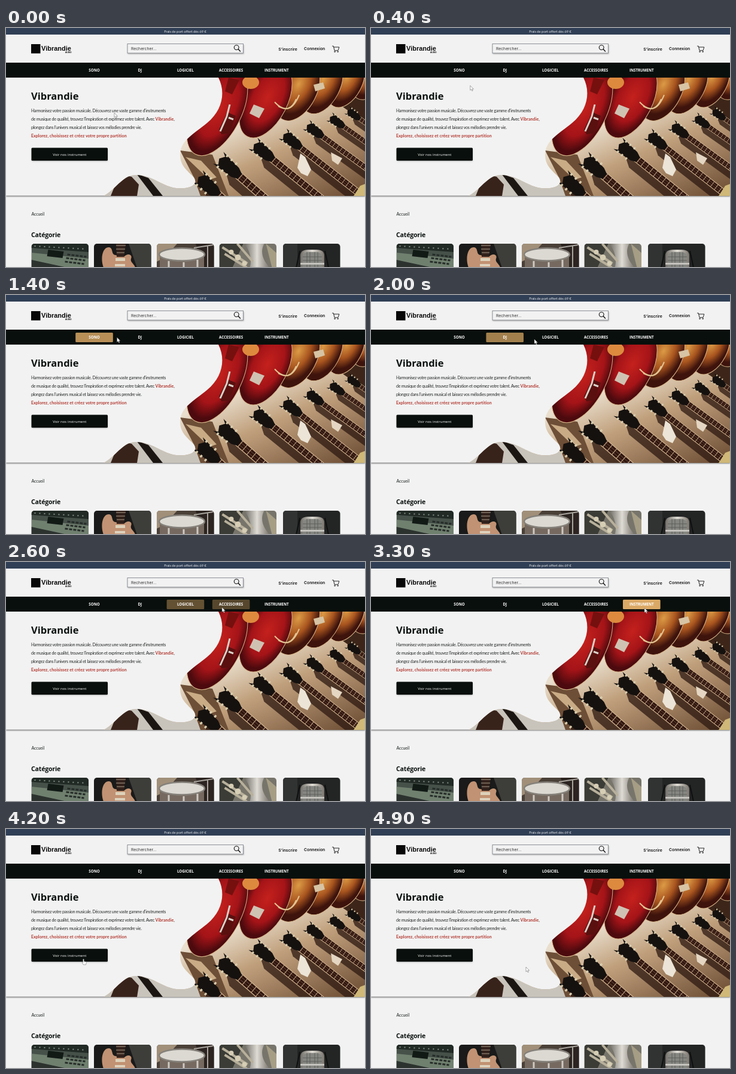
Write an HTML page that moves like this. It is 600x400 px and loops after 5 s.

```html
<!DOCTYPE html>
<html lang="fr">
<head>
<meta charset="utf-8">
<title>Vibrandie</title>
<style>
  html, body { margin: 0; width: 100%; height: 100%; overflow: hidden; background: #f2f2f2; }
  svg { display: block; width: 600px; height: 400px; }
  .sans { font-family: "Open Sans", sans-serif; }
  .ui { font-family: Inter, sans-serif; }
  .copy { font-family: Lato, sans-serif; font-size: 7.1px; letter-spacing: -.28px; }
  .bold { font-weight: 700; }
  .red { font-weight: 700; fill: #b23a32; letter-spacing: .02px; }
</style>
</head>
<body>
<svg viewBox="0 0 600 400">
  <defs>
    <linearGradient id="wall" x1="0" y1="0" x2="1" y2="1">
      <stop offset="0" stop-color="#d9c3a8"/>
      <stop offset=".45" stop-color="#eadfce"/>
      <stop offset=".65" stop-color="#c0a07c"/>
      <stop offset="1" stop-color="#6a4a31"/>
    </linearGradient>
    <radialGradient id="cherry" cx=".5" cy=".45">
      <stop offset="0" stop-color="#c4211d"/>
      <stop offset=".65" stop-color="#a51418"/>
      <stop offset="1" stop-color="#4c0a0e"/>
    </radialGradient>
    <radialGradient id="amber" cx=".45" cy=".4">
      <stop offset="0" stop-color="#dc9a45"/>
      <stop offset=".55" stop-color="#a9551f"/>
      <stop offset="1" stop-color="#3d130c"/>
    </radialGradient>
    <linearGradient id="metal">
      <stop offset="0" stop-color="#6f6c66"/>
      <stop offset=".5" stop-color="#dedbd4"/>
      <stop offset="1" stop-color="#77726a"/>
    </linearGradient>
    <filter id="soft" x="-10%" y="-30%" width="120%" height="180%"><feGaussianBlur stdDeviation="1"/></filter>
    <clipPath id="wave">
      <path d="M355 83C367 106 363 137 336 159C313 178 291 189 291 212C291 232 305 240 314 250C322 262 308 270 285 268C262 266 245 246 217 246C195 246 184 270 163 281H600V83Z"/>
    </clipPath>
    <clipPath id="card"><rect width="95.5" height="60" rx="5"/></clipPath>
  </defs>

  <rect width="600" height="400" fill="#f2f2f2"/>
  <rect y="279" width="600" height="3" fill="#777" filter="url(#soft)"/>
  <rect y="83" width="600" height="197.5" fill="#f2f2f2"/>

  <!-- hero picture -->
  <g clip-path="url(#wave)">
    <rect x="160" y="83" width="440" height="198" fill="url(#wall)"/>
    <path d="M160 281V240H300L330 281Z" fill="#c9c4bb"/>
    <path d="M175 281L184 259Q196 245 210 249L222 262L219 281Z" fill="#38231b"/>
    <path d="M218 244L238 251L262 281H246Z" fill="#1c1613"/>
    <path d="M291 205L345 212L372 281H325L314 250Z" fill="#6d4e36"/>
    <path d="M300 216L326 222L352 250L340 254Z" fill="#c9ac86"/>
    <path d="M540 83H600V158L560 130Z" fill="#3d2619"/>
    <g id="bodies"></g>
    <ellipse cx="409" cy="91" rx="14" ry="11" fill="#dd8a3e"/>
    <path d="M372 83L390 87L378 111L366 106Z" fill="#75100f"/>
    <path d="M370 141L384 147L374 176L360 178L356 170Z" fill="#59100f"/>
    <path d="M358 173L369 148L374 128M372 150L380 153" fill="none" stroke="#d9d2c8" stroke-width="3"/>
    <path d="M414 128L432 135L423 151L407 143Z" fill="#cfc2b2"/>
    <path d="M449 124Q474 151 490 112M455 131Q475 143 485 119" fill="none" stroke="#e2c492" stroke-width="2"/>
    <path d="M514 95L530 91L533 101L517 106Z" fill="#d7c4a4"/>
    <g id="necks"></g>
    <path d="M492 210L500 216L510 237L504 248L493 243L487 234Z" fill="#ece4d6"/>
    <path d="M543 208L562 218L555 229L545 222Z" fill="#e4d6c2"/>
    <path d="M581 281L592 264L600 261V281Z" fill="#cfb878"/>
  </g>

  <!-- header -->
  <rect width="600" height="11" fill="#303f55"/>
  <text x="299.5" y="8.3" text-anchor="middle" font-family="Lato, sans-serif" font-size="6" letter-spacing="-.1" fill="#dfe2e6">Frais de port offert dès 69 €</text>
  <rect x="42" y="27" width="15.5" height="15.5" fill="#080808"/>
  <g font-family="'Liberation Sans', sans-serif" class="bold" fill="#0a0a0a">
    <text x="59" y="38" font-size="11">Vibrandie</text>
    <text x="109.5" y="42.3" font-size="3.3" text-anchor="end">AUDIO</text>
  </g>
  <rect x="203.5" y="28" width="194" height="15.5" fill="#777" opacity=".6" filter="url(#soft)"/>
  <rect x="203" y="26.5" width="193.5" height="15.5" fill="#f2f2f2" stroke="#757b80" stroke-width=".8"/>
  <g class="ui" font-size="6.8" fill="#111">
    <text x="209" y="37" fill="#333">Rechercher...</text>
    <text x="455.3" y="37.5" font-weight="600">S'inscrire</text>
    <text x="498" y="37.2" font-weight="600">Connexion</text>
  </g>
  <g fill="none" stroke="#111" stroke-linecap="round" stroke-linejoin="round">
    <path d="M388.3 35.6L391.5 39" stroke-width="1.4"/>
    <circle cx="385.2" cy="32.6" r="3.9" stroke-width="1.1"/>
    <path d="M545.5 30.3H547.3L549 37.7H555L556.8 32H547.8" stroke-width=".9"/>
    <circle cx="549.5" cy="39.6" r=".9" stroke-width=".8"/>
    <circle cx="554.6" cy="39.6" r=".9" stroke-width=".8"/>
  </g>
  <rect y="58" width="600" height="25" fill="#080f0c"/>
  <g id="nav" class="sans bold" font-size="6.2" fill="#fff" text-anchor="middle"></g>

  <!-- hero copy -->
  <text x="42" y="120" class="sans bold" font-size="16.5" fill="#0b120f">Vibrandie</text>
  <g class="copy" fill="#242826">
    <text x="42" y="141.2">Harmonisez votre passion musicale. Découvrez une vaste gamme d'instruments</text>
    <text x="42" y="155">de musique de qualité, trouvez l'inspiration et exprimez votre talent. Avec <tspan class="red">Vibrandie</tspan>,</text>
    <text x="42" y="168.8">plongez dans l'univers musical et laissez vos mélodies prendre vie.</text>
    <text x="42" y="182.6" class="red">Explorez, choisissez et créez votre propre partition</text>
  </g>
  <rect x="43" y="202" width="127" height="21" rx="2" fill="#666" opacity=".5" filter="url(#soft)"/>
  <rect x="42.5" y="200.5" width="127.5" height="21.5" rx="1.5" fill="#080f0c"/>
  <text x="106.3" y="213.6" class="sans" font-size="6.1" font-weight="500" text-anchor="middle" fill="#fff">Voir nos instrument</text>

  <text x="42.5" y="314" font-family="Lato, sans-serif" font-size="7" letter-spacing="-.1" fill="#1c2421">Accueil</text>
  <text x="42" y="350" class="sans bold" font-size="10.6" letter-spacing="-.2" fill="#0b120f">Catégorie</text>

  <!-- category cards -->
  <g transform="translate(42.5 361)"><g clip-path="url(#card)">
    <rect width="96" height="40" fill="#46514a"/>
    <path d="M0 0H96V14L0 7Z" fill="#222a26"/>
    <path d="M0 15L96 25V40H0Z" fill="#70806f"/>
    <path d="M0 27L60 40H0Z" fill="#2c332f"/>
    <path d="M28 10L54 13L52 24L26 21Z" fill="#121a16"/>
    <path d="M60 18L92 22M58 24L90 28M56 30L88 34" stroke="#252c28" stroke-width="3" stroke-dasharray="5 2"/>
    <path d="M5 4L92 9" stroke="#829087" stroke-width="2" stroke-dasharray="2 6"/>
  </g></g>
  <g transform="translate(147 361)"><g clip-path="url(#card)">
    <rect width="96" height="40" fill="#191a19"/>
    <path d="M58 0H96V40H72Z" fill="#3d3d39"/>
    <path d="M16 40C10 24 15 5 25 6C33 7 28 18 36 19L50 22C56 15 65 18 62 25C60 31 67 33 69 40Z" fill="#c19273"/>
    <path d="M37 0H53L50 22H38Z" fill="#33221c"/>
    <path d="M37 3H53M37 9H52M38 15H51" stroke="#c9bda8" stroke-width=".8"/>
    <path d="M36 24H52V29H36ZM35 34H52V38H35Z" fill="#ddd2bc"/>
  </g></g>
  <g transform="translate(252 361)"><g clip-path="url(#card)">
    <rect width="96" height="40" fill="#4a4038"/>
    <path d="M0 0H34L12 24L0 30Z" fill="#a18f79"/>
    <path d="M65 0H96V40H76Z" fill="#2c2420"/>
    <path d="M5 20V40H79V20Z" fill="#766a60"/>
    <ellipse cx="42" cy="18" rx="38" ry="10.5" fill="#dcd9d3" stroke="#85817a" stroke-width="2.5"/>
    <path d="M20 29V40M45 31V40M68 27V40" stroke="#cfcac3" stroke-width="3"/>
    <path d="M62 7L94 2M85 4V40" stroke="#aaa59e" stroke-width="2"/>
  </g></g>
  <g transform="translate(356.5 361)"><g clip-path="url(#card)">
    <rect width="96" height="40" fill="#77756b"/>
    <path d="M0 0H40L22 40H0Z" fill="#3b3c36"/>
    <path d="M42 0H75C67 15 74 29 84 40H51C55 26 51 12 42 0Z" fill="url(#metal)"/>
    <path d="M5 6L47 33M9 17L46 40M30 0L56 30" stroke="#b8b09b" stroke-width="4"/>
    <path d="M78 0L96 16V40H88Z" fill="#a69d85"/>
    <g fill="#d6cdb5"><circle cx="20" cy="14" r="4"/><circle cx="31" cy="23" r="5"/><circle cx="42" cy="33" r="4"/></g>
  </g></g>
  <g transform="translate(463 361)"><g clip-path="url(#card)">
    <rect width="96" height="40" fill="#232424"/>
    <path d="M0 0H24V40H0Z" fill="#313232"/>
    <path d="M29 40V20Q29 10 42 10H56Q69 10 69 20V40Z" fill="url(#metal)"/>
    <path d="M33 40V22Q33 14 43 14H55Q65 14 65 22V40Z" fill="#858681"/>
    <path d="M40 14V40M45 14V40M53 14V40M58 14V40M33 22H65M33 28H65" stroke="#555753" stroke-width=".8"/>
    <path d="M29 32H69V35H29Z" fill="#c4c2bc"/>
    <path d="M22 40L28 12M76 40L70 12" stroke="#0e0f0f" stroke-width="2"/>
  </g></g>

  <g id="cursor" fill="#fff" stroke="#555" stroke-width=".5" stroke-linejoin="round">
    <path id="arrow" d="M0 0V7.8L1.8 6.2L3.1 9L4.4 8.4L3.2 5.7H5.6Z"/>
    <path id="hand" d="M-.8 .6Q0-.5 .8 .6V4L4.2 4.7Q5 5 4.8 6.2L4 9.6H-.2L-2.4 6.2Q-2.6 5.2-1.7 5.3L-.8 6Z"/>
  </g>
</svg>
<script>
const NS = 'http://www.w3.org/2000/svg';
const $ = id => document.getElementById(id);
function add(parent, tag, attrs) {
  const el = document.createElementNS(NS, tag);
  for (const k in attrs) el.setAttribute(k, attrs[k]);
  return parent.appendChild(el);
}

// cx, cy, rx, ry, fill
[
  [604, 86, 24, 36, 'amber'], [568, 91, 27, 45, 'amber'], [528, 97, 30, 50, 'amber'],
  [487, 105, 32, 54, 'amber'], [434, 122, 36, 67, 'cherry'], [353, 140, 40, 80, 'cherry']
].forEach(([cx, cy, rx, ry, fill]) => add($('bodies'), 'ellipse', {
  cx, cy, rx, ry, fill: `url(#${fill})`, stroke: '#d8b58a', 'stroke-width': 1,
  transform: `rotate(27 ${cx} ${cy})`
}));

// x, y, scale, angle of each hanging neck
[
  [581, 145, .62, 35], [553, 157, .7, 35], [516, 172, .8, 36],
  [478, 189, .9, 38], [430, 207, 1, 39], [373, 233, 1.1, 41], [338, 264, 1.1, 42]
].forEach(([x, y, s, a]) => {
  const g = add($('necks'), 'g', { transform: `translate(${x} ${y}) rotate(${a}) scale(${s})` });
  add(g, 'path', { d: 'M-4 6L18 20H170V5Z', fill: '#2c1910', opacity: .75 });
  add(g, 'path', { d: 'M12-6H170V6H12Z', fill: '#30150e', stroke: '#cfb18c', 'stroke-width': 1.2 });
  add(g, 'path', { d: 'M22 0H170', stroke: '#c5a887', 'stroke-width': 11, 'stroke-dasharray': '1 8' });
  add(g, 'path', { d: 'M0-2H170M0 2H170', stroke: '#a89075', 'stroke-width': .4 });
  add(g, 'path', { d: 'M-22-12L-15-8L-20 0L-15 8L-22 12L12 9L21 5V-5L12-9Z', fill: '#15110f' });
  add(g, 'path', { d: 'M-15-11H12M-15 11H12', stroke: '#d9cdae', 'stroke-width': 4, 'stroke-dasharray': '3 6' });
});

// label, hover start, hover end
const FADE = 300;
const items = [
  ['SONO', 570, 1350], ['DJ', 1450, 1920], ['LOGICIEL', 2000, 2430],
  ['ACCESSOIRES', 2490, 2920], ['INSTRUMENT', 3000, 3500]
].map(([label, on, off], i) => {
  const x = 147.5 + i * 76.2;
  const box = add($('nav'), 'rect', { x: x - 31.3, y: 63, width: 62.6, height: 16, rx: 1.5, fill: '#dba966' });
  add($('nav'), 'text', { x, y: 73 }).textContent = label;
  return { box, on, off };
});

// time, x, y
const path = [
  [0, 181, 142], [300, 171, 108], [550, 158, 79], [800, 152, 70], [1170, 152, 70],
  [2000, 273, 74], [2600, 361, 76], [3300, 457, 77], [3500, 448, 82],
  [4100, 132, 217], [4200, 129.5, 217.5], [4400, 148, 219], [4900, 259, 231], [5000, 259, 231]
];
const clamp = v => Math.max(0, Math.min(1, v));

function place(t) {
  const i = path.findIndex(p => p[0] > t);
  const [t0, x0, y0] = path[i - 1], [t1, x1, y1] = path[i];
  const k = (t - t0) / (t1 - t0);
  return [x0 + (x1 - x0) * k, y0 + (y1 - y0) * k];
}

function draw(now) {
  const t = Math.floor(now % 5000 / 100) * 100;
  const [x, y] = place(t);
  const link = x > 42 && x < 170 && y > 200 && y < 222;
  $('cursor').setAttribute('transform', `translate(${x} ${y})`);
  $('arrow').style.display = link ? 'none' : '';
  $('hand').style.display = link ? '' : 'none';
  for (const { box, on, off } of items)
    box.setAttribute('opacity', Math.min(clamp((t - on) / FADE), 1 - clamp((t - off) / FADE)));
}

const start = performance.now();
function loop() {
  draw(performance.now() - start);
  requestAnimationFrame(loop);
}
loop();
</script>
</body>
</html>
```
